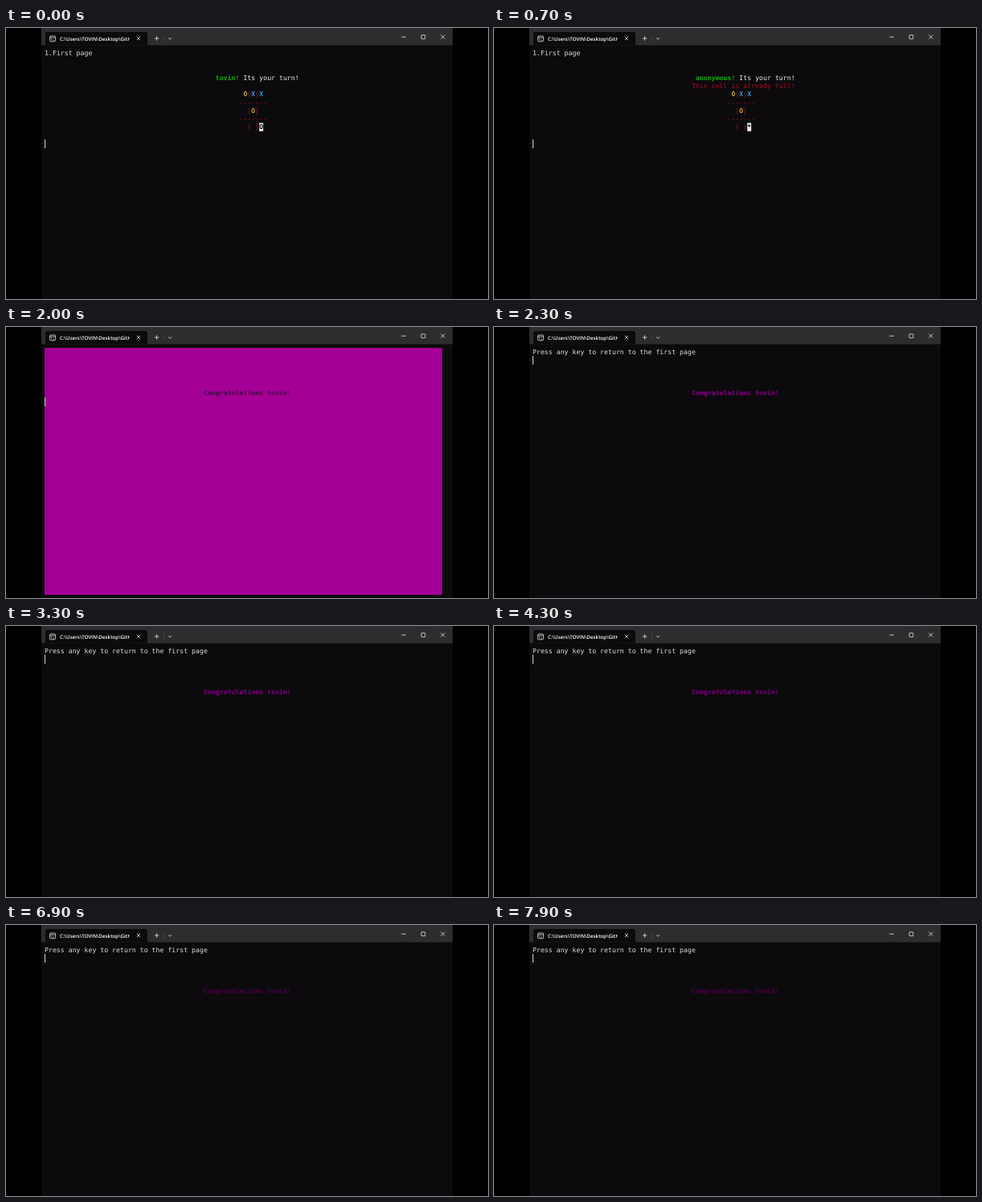
An HTML page for the animation above (8 s loop, 600 px wide and 338 px high).

```html
<!DOCTYPE html>
<html lang="en">
<head>
<meta charset="utf-8">
<title>Console game</title>
<style>
  html, body { margin: 0; width: 100%; height: 100%; overflow: hidden; background: #000; }
  svg { display: block; width: 600px; height: 338px; }
  text { white-space: pre; text-rendering: geometricPrecision; }
  .cell { font: 8.22px "DejaVu Sans Mono", monospace; }
  .bold { font-weight: bold; }
  .title { font: 600 6.2px "Open Sans", sans-serif; fill: #fff; }
  .icon { fill: none; stroke: #e8e8e8; stroke-width: .8; }
</style>
</head>
<body>
<svg viewBox="0 0 600 338" xmlns="http://www.w3.org/2000/svg">
  <defs><clipPath id="tab"><rect x="66" y="5" width="88" height="17"/></clipPath></defs>
  <rect width="600" height="338" fill="#000"/>
  <rect x="44" width="512" height="338" fill="#0c0a0d"/>
  <rect x="44" width="512" height="21.5" fill="#2e2c2f"/>
  <path d="M47 21.5q2 0 2-2V8q0-3 3-3H173q3 0 3 3V19.5q0 2 2 2z" fill="#0c0a0d"/>
  <text class="title" x="67" y="15.6" clip-path="url(#tab)">C:\Users\TOVIN\Desktop\GitHub</text>
  <g class="icon">
    <rect x="54.6" y="10" width="7" height="6.8" rx="1.2"/>
    <path d="M54.6 12h7M56.2 13.4l1 .9-1 .9M58.3 15.2h1.8"/>
    <path d="M162.8 10.8l4.4 4.4m0-4.4l-4.4 4.4M185 13h5.4M187.7 10.3v5.4"/>
    <path d="M196.5 9v8" stroke="#444246"/>
    <path d="M202 12.2l2 2 2-2M492.3 11.2h5.4M541.2 8.6l5 5m0-5l-5 5"/>
    <rect x="517" y="8.8" width="4.8" height="4.8" rx=".5"/>
  </g>
  <g id="screen"></g>
</svg>
<script>
const LOOP = 8000, CELL_W = 4.949, CELL_H = 10.27, LEFT = 48, TOP = 26;
const WHITE = '#dedede', GREEN = '#18a810', YELLOW = '#bfa94a',
      BLUE = '#3a96dd', RED = '#b80e1e', BLACK = '#0c0a0d';
const screen = document.getElementById('screen');
const parts = [];

function add(tag, attrs, spans, text = '') {
  const el = document.createElementNS('http://www.w3.org/2000/svg', tag);
  for (const key in attrs) el.setAttribute(key, attrs[key]);
  el.textContent = text;
  screen.append(el);
  parts.push({ el, spans });
  return el;
}

const write = (col, row, text, fill, spans, bold = false) => add('text', {
  x: LEFT + col * CELL_W, y: TOP + row * CELL_H + 8,
  class: bold ? 'cell bold' : 'cell', fill
}, spans, text);

const block = (col, row, cols, rows, fill, spans) => add('rect', {
  x: LEFT + col * CELL_W, y: TOP + row * CELL_H,
  width: cols * CELL_W, height: rows * CELL_H, fill
}, spans);

const caret = (row, spans) => add('rect', {
  x: LEFT, y: Math.round(TOP + row * CELL_H), width: 1, height: 11, fill: '#d0d0d0'
}, spans);

const game = [[0, 2000]];

// Header and messages
write(0, 0, '1.First page', WHITE, [[0, 900]]);
write(0, 0, 'Press any key to end game', WHITE, [[900, 2000]]);
write(43, 3, 'tovin!', GREEN, [[0, 500]], true);
write(50, 3, 'Its your turn!', '#ececec', [[0, 500]]);
write(41, 3, 'anonymous!', GREEN, [[500, 2000]], true);
write(52, 3, 'Its your turn!', '#ececec', [[500, 2000]]);
write(40, 4, 'This cell is already full!', '#a50d1c', [[700, 2000]]);

// Board
for (const [row, marks] of [[5, 'OXX'], [7, ' O '], [9, '   ']]) {
  [...marks].forEach((mark, i) => {
    if (mark !== ' ') write(50 + 2 * i, row, mark, mark === 'O' ? YELLOW : BLUE, game, true);
    if (i < 2) write(51 + 2 * i, row, '|', RED, game);
  });
}
for (const row of [6, 8]) write(49, row, '-------', RED, game);
block(54, 9, 1, 1, '#f2f2f2', game);
write(54, 9, 'O', BLACK, [[0, 700]], true);
write(54, 9, '*', BLACK, [[700, 2000]], true);

// Result
block(0, 0, 100, 30, '#a50096', [[2000, 2300]]);
write(0, 0, 'Press any key to return to the first page', WHITE, [[2300, LOOP]]);
const result = write(40, 5, 'Congratulations tovin!', '#000', [[2000, LOOP]], true);
const resultColors = [[2000, '#48004a'], [2300, '#850083'], [3100, '#80007e'],
                      [4000, '#7a0078'], [5300, '#4a0048'], [6400, '#470045']];

caret(11, [[0, 900]]);
caret(6, [[2000, 2300]]);
caret(1, [[900, 1200], [1800, 2000], [2300, 2800], [3300, 3800], [4300, 4800],
          [5300, 5800], [6800, 7000], [7900, LOOP]]);

function draw(now) {
  const t = now % LOOP;
  for (const { el, spans } of parts) {
    const on = spans.some(([from, to]) => t >= from && t < to);
    el.style.display = on ? '' : 'none';
  }
  const step = resultColors.filter(([from]) => t >= from).pop();
  if (step) result.setAttribute('fill', step[1]);
}

const start = performance.now();
function tick() {
  draw(performance.now() - start);
  requestAnimationFrame(tick);
}
tick();
</script>
</body>
</html>
```
